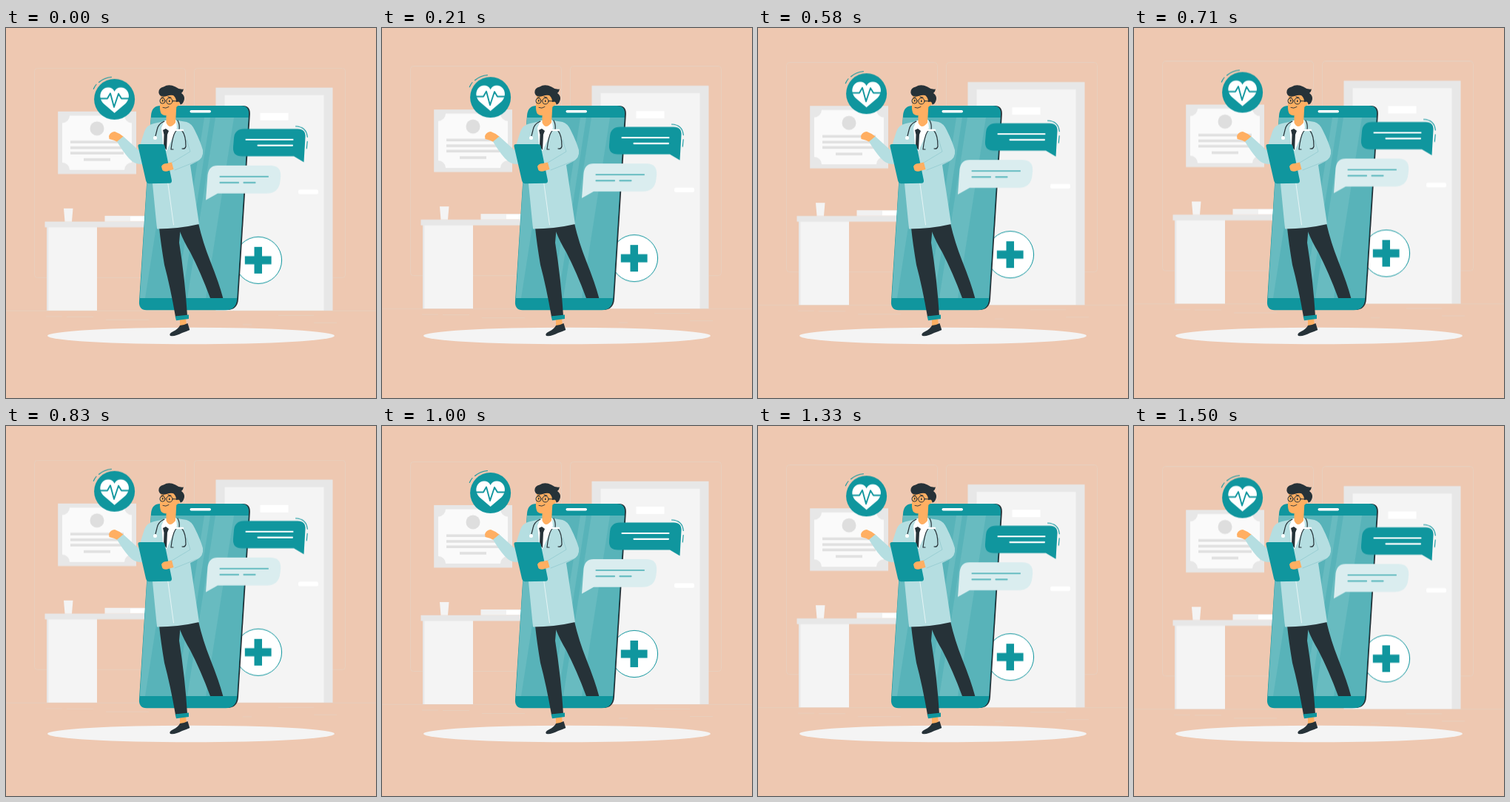
Recreate the animation shown at these times as an HTML page. Size 500 px wide and 500 px high, loop 1540 ms.

```html
<!DOCTYPE html>
<html lang="en">
<head>
<meta charset="utf-8">
<title>Online doctor</title>
<style>
  html, body { margin: 0; width: 100%; height: 100%; overflow: hidden; background: #eec8b1; }
  svg { display: block; width: 100%; height: 100%; }
  .teal { fill: #10969e; }
  .ink { fill: #263238; }
  .skin { fill: #ffaf62; }
  .coat { fill: #b5dee1; }
  .pale { fill: #f4f4f4; }
  .grey { fill: #e7e7e7; }
  .white { fill: #fff; }
  .line { fill: none; stroke-linecap: round; stroke-linejoin: round; }
  .faint { fill: none; stroke: #e8cfbd; stroke-width: 1; }
  .tealLine { stroke: #10969e; }
  .inkLine { stroke: #263238; }
</style>
</head>
<body>
<svg viewBox="0 0 500 500">
  <defs>
    <clipPath id="screen"><path d="M196 121H327.5L312 365H181Z"/></clipPath>
  </defs>

  <g class="float">
    <g class="faint">
      <rect x="38.5" y="54.5" width="204" height="283" rx="4"/>
      <rect x="254.5" y="54.5" width="204" height="283" rx="4"/>
      <path d="M0 382.3H500M82 390.5H118M135 394.5H193M368 388.5H416M416 398.5H447M54 390H76M320 401H332"/>
    </g>

    <!-- door -->
    <path class="grey" d="M283.5 80.8H441.5V382H283.5Z"/>
    <path class="pale" d="M295.5 90.8H429.5V382H295.5Z"/>
    <rect class="white" x="343.5" y="115" width="38" height="10"/>
    <rect class="white" x="395" y="218.5" width="27" height="6.3" rx="2"/>

    <!-- certificate -->
    <rect class="grey" x="70.2" y="113" width="105.8" height="84.5"/>
    <path fill="#fafafa" d="M86 118.5H160A10 10 0 0 0 170 128.5V182A10 10 0 0 0 160 192H86A10 10 0 0 0 76 182V128.5A10 10 0 0 0 86 118.5Z"/>
    <circle cx="123" cy="136" r="9.5" fill="#dedede"/>
    <path d="M87 154.2H159M87 162H159M87 169.2H159M105 178H141" stroke="#e0e0e0" stroke-width="3.6"/>

    <!-- desk -->
    <path class="pale" d="M55 269H123V382H55Z"/>
    <path class="grey" d="M55 269H57.3V382H55ZM52.5 261.7H196V269.5H52.5Z"/>
    <path class="pale" d="M78 244H90.5L89 261.7H79.5Z"/>
    <path fill="#f1f1f1" d="M133.5 254H192V261.7H133.5Z"/>
    <path class="white" d="M168 254.8H192V261H168Z"/>

    <!-- heart badge -->
    <circle class="teal" cx="146.6" cy="96.5" r="27.5"/>
    <path class="white" d="M146.6 86C143.5 79 134 78.8 129.5 85C125.5 91 127.5 98 132 102.5L146.6 115L161.3 102.5C165.8 98 167.8 91 163.8 85C159.3 78.8 149.7 79 146.6 86Z"/>
    <path class="line tealLine" stroke-width="1.9" d="M127 95.5H137L141 88.5L146 107L152 89L156 95.5H166.5"/>
    <path class="line tealLine" stroke-width="1.1" d="M118.3 82.5Q119.8 79 122 76.5M125.5 73.5Q132.5 67.5 142.5 66.5"/>

    <!-- plus badge -->
    <circle class="white tealLine" cx="341" cy="314" r="31.6"/>
    <path class="teal" d="M335.5 296H346V308.6H358.6V319.4H346V332H335.5V319.4H322.8V308.6H335.5Z"/>
  </g>

  <ellipse class="pale" cx="250" cy="416" rx="194" ry="11.3"/>

  <!-- phone -->
  <path class="ink" d="M212 105H320Q330.5 105 329.8 117L314 366Q313 381 299 381H192Z"/>
  <path class="teal" d="M209 105H317.5Q328.8 105 328 117L312.3 366Q311 381.3 297 381.3H190Q179 381 180 369L196 118Q197 105 209 105Z"/>
  <g clip-path="url(#screen)">
    <path d="M170 121H340V365H170Z" fill="#58b3b9"/>
    <path d="M283 121H308L270 365H245ZM268 121H276L238 365H230ZM196 121H226L188 365H170Z" fill="#68bbc0"/>
  </g>
  <rect class="white" x="248.5" y="111" width="28.5" height="3.4" rx="1.7"/>

  <!-- legs -->
  <path class="ink" d="M232 268L260 264Q266 290 276 315Q288 345 293.3 365H276Q263 330 249 303Q240 288 235 275Z"/>
  <path class="skin" d="M235 392H243L244 402L235 403Z"/>
  <path class="ink" d="M207 270L236 267L234 290Q242 340 245 389L229 390Q222 350 214 320Q209 290 207 270Z"/>
  <path class="teal" d="M228.6 389.5L247 387.5V393L230 395.3Z"/>
  <path class="ink" d="M235 402Q241 401.5 245.5 399L248.3 408Q243 410.5 238 412Q229 417 222 416Q219.500 413 226 410Q233 406.500 235 402Z"/>

  <!-- coat -->
  <path class="skin" d="M139 146Q141 140.500 147 140Q153 142 159 147L152.500 155Q146 151 139.500 150Z"/>
  <path class="coat" d="M150 153.500L158.500 146.500L179 165L187 140Q190 131 200 129L214 126L232 125L244 127Q251 129 255 138Q263 154 266 165Q267.500 176 257 181L249 185L261 265Q233 271.500 204 271.500L197 200L184 184Q174 185 166 176Q158 167 150 153.500Z"/>
  <path class="white" d="M214 125L210 135L213 165L217 166L231 135L230 124Z"/>
  <path class="ink" d="M212 138L216 136L220 139L218 144L217 165L213 160L213.500 144Z"/>
  <path class="line" stroke="#e6f5f6" stroke-width="1" d="M218 204L226.500 266"/>
  <path class="line" stroke="#8fc8cd" stroke-width=".7" d="M244 151L249 167L224 182M228 192L258 180"/>

  <!-- head -->
  <path class="skin" d="M216.500 112V128Q221 138 229 128L230.500 103Z"/>
  <path class="skin" d="M209 90Q209 98 208 104Q207.500 112 210 116Q214 120 221 116.500L231 106Q236 104 236 99L231 88Z"/>
  <path class="ink" d="M206.500 88Q205.500 81 213 79.500Q220 75 229 79.500Q234 83.500 240 82.500Q239.500 86 237 88Q242.500 92 240.500 98Q239 103 235.500 103.500Q235 98 230 100Q230 94 226 91Q222 90 217 92Q208 94 206.500 88Z"/>
  <g class="line inkLine">
    <circle cx="211.500" cy="98.500" r="3.600"/>
    <circle cx="221" cy="98.800" r="4.100"/>
    <path d="M225 98.500L232 99M210 94L213 93.500M219 93L223 94" stroke-width="1.100"/>
    <path d="M212 107.500Q216 109.500 220 106.500" stroke-width=".9"/>
  </g>
  <path class="ink" d="M211 97H212.500V99.500H211ZM220 97.500H221.500V100H220Z"/>

  <!-- stethoscope -->
  <path class="line inkLine" stroke-width="1.200" d="M214 126Q205 130 204 138L202 146M232 125Q235 130 234 138M226 164H223Q225 146 229 140Q232 136 238 139Q243 145 243 160Q242 164 238 163"/>
  <path class="line" stroke="#fff" stroke-width="2.500" d="M230 138H239"/>
  <circle class="white" cx="201.500" cy="148.500" r="2.500"/>

  <!-- clipboard -->
  <path class="teal" d="M181 157H211Q214 157 214.600 160L224 206Q224.300 209.500 221 209.700L193 210.200Q190 210 189 206L178.500 160Q178 157 181 157Z"/>
  <path class="skin" d="M210 187Q212 183 217 183L224 181.500L226.500 191L218 193.500Q212 194.500 211 191Z"/>

  <g class="float">
    <path class="teal" d="M322 136.500H394Q405 136.500 404.500 147L402.500 181.500L389 173.500H319Q306 173.500 307 161L308 149Q309 136.500 322 136.500Z"/>
    <path class="line" stroke="#fff" stroke-width="2.200" d="M324.500 151H387.500M340.500 158.800H387"/>
    <path class="line tealLine" stroke-width="1.100" d="M391.500 133Q406 133.500 407.300 147.500M407.200 153.500L406.300 163"/>
    <path fill="#daedef" d="M286 186H357Q372 186 371.200 201L370.500 207Q369 223.700 352 223.700H286L270 232.700L272.500 199Q274 186 286 186Z"/>
    <path class="line" stroke="#68bdc2" stroke-width="2.200" d="M289.500 201H354M289.500 209.200H314M321.500 209.200H336.500"/>
  </g>
</svg>
<script>
  const LOOP = 1540;
  // [time in ms, vertical shift in px]
  const steps = [[0, 0], [722, -9.7], [1505, 0.45], [LOOP, 0]];
  const frames = steps.map(([t, y]) => ({ offset: t / LOOP, transform: `translateY(${y}px)` }));
  for (const layer of document.querySelectorAll('.float')) {
    layer.animate(frames, { duration: LOOP, iterations: Infinity, easing: 'linear' });
  }
</script>
</body>
</html>
```
